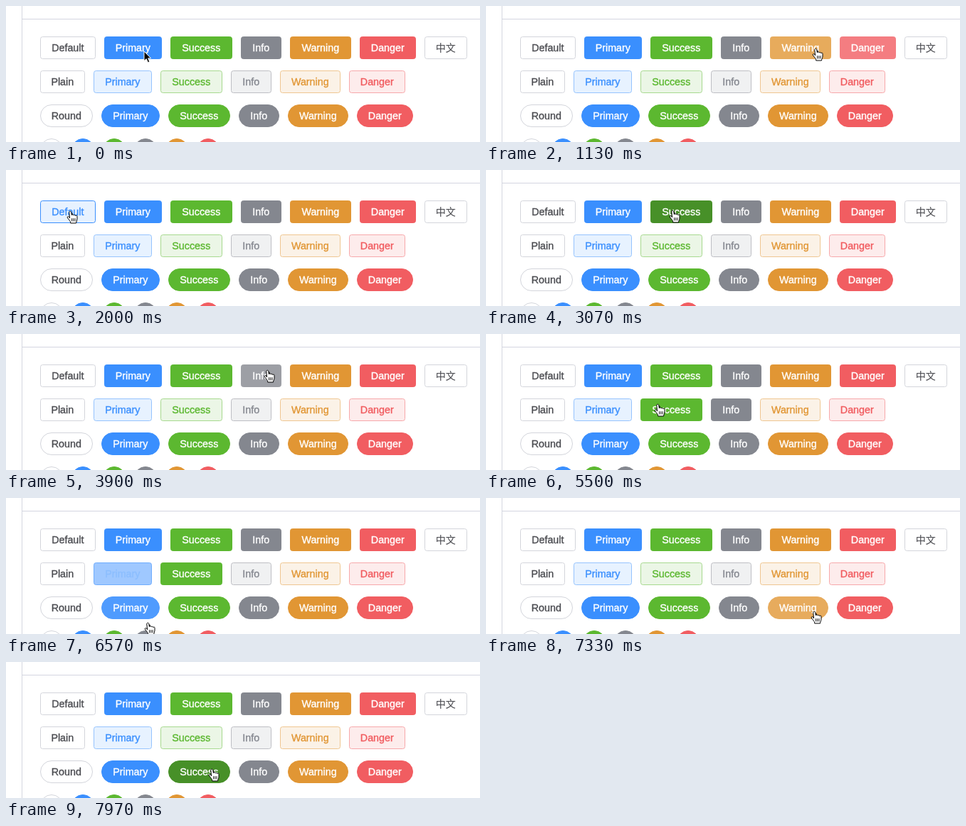
Animation, 666 px wide and 192 px high, one loop 8000 ms. Source, as an HTML page:

```html
<!DOCTYPE html>
<html lang="en">
<head>
<meta charset="utf-8">
<title>Buttons</title>
<style>
html, body { margin: 0; width: 100%; height: 100%; overflow: hidden; background: #fff; }
svg { display: block; width: 666px; height: 192px; }
text { font: 14.3px "Liberation Sans", Arial, sans-serif; text-anchor: middle; stroke-width: .35px; }
.cjk { font: 14px "Noto Sans CJK SC", "Noto Sans CJK", sans-serif; stroke-width: .1px; }
</style>
</head>
<body>
<svg viewBox="0 0 666 192">
  <path d="M22.5 0V192M22 18.5H666" stroke="#d4d6e0" fill="none"/>
  <g id="buttons"></g>
  <path id="arrow" d="M0 0V13.5L3.2 10.6 5.4 15.7 7.8 14.7 5.6 9.8H9.6Z" stroke="#fff"/>
  <g id="hand" stroke="#000" stroke-linejoin="round" stroke-linecap="round">
    <path d="M-1.5 9.5L-2.2 2C-2.3 0 .3-.4 .7 1.4L1.4 5.6C2-.1 2 4.6 2.2 5.2 2.8 4.6 4 4.8 4.4 6 4.9 5 6.5 5.2 6.8 6.7 7.3 5.6 9 5.8 9 7.4V11C9 13.3 7.6 14.6 7.5 17H-.3C-.3 15-.8 14.4-1.5 13.4-2.5 11.8-4.1 10.7-4.8 9.1-5.2 7.7-3.4 7.1-2.4 8.2Z" fill="#fff"/>
    <path d="M1.6 10.6V14M3.8 10.6V14M6 10.6V14" stroke-width=".9"/>
  </g>
</svg>
<script>
const NS = 'http://www.w3.org/2000/svg';
const LOOP = 8000, FRAMES = 240, STEP = LOOP / FRAMES, SUB = 16;
const FADE_IN = 40, HOLD = 80, FADE_OUT = 60;
const HEIGHT = 32, GAP = 12;
const $ = id => document.getElementById(id);

const rgb = hex => [1, 3, 5].map(i => parseInt(hex.slice(i, i + 2), 16));
const mix = (a, b, k) => a.map((v, i) => v + (b[i] - v) * k);
const css = c => `rgb(${c.map(Math.round)})`;

const WHITE = rgb('#ffffff'), BLUE = rgb('#3a8ffe');
const tint = (c, k) => mix(c, WHITE, k);

const tone = (label, width, hex, hover) => {
  const c = rgb(hex);
  return { label, width, c, hover: hover ? rgb(hover) : tint(c, .2) };
};
const tones = [
  tone('Primary', 81.4, '#3a8ffe'),
  tone('Success', 87, '#5cb830', '#479028'),
  tone('Info', 57, '#84878f'),
  tone('Warning', 85.6, '#e19634'),
  tone('Danger', 79, '#f15d61')
];

// A style gives [background, border, text] at rest and hovered
const neutral = [[WHITE, rgb('#d3d5db'), rgb('#4c4d52')], [tint(BLUE, .88), BLUE, BLUE]];
const solid = ({ c, hover }) => [[c, c, WHITE], [hover, hover, WHITE]];
const plain = ({ c }) => [[tint(c, .88), tint(c, .46), c], [c, c, WHITE]];

const buttons = [];

function make(tag, attrs) {
  const el = document.createElementNS(NS, tag);
  for (const k in attrs) el.setAttribute(k, attrs[k]);
  return $('buttons').appendChild(el);
}

function addButton(label, left, y, width, rx, looks) {
  const x = Math.round(left), w = Math.round(left + width) - x;
  const box = make('rect', { x: x + .5, y: y + .5, width: w - 1, height: HEIGHT - 1, rx });
  const text = make('text', { x: x + w / 2 - .2, y: y + 21, class: label === '中文' ? 'cjk' : '' });
  text.textContent = label;
  buttons.push({ x, y, w, looks, box, text, level: 0, hold: 0 });
  return left + width + GAP;
}

function addRow(first, width, y, rx, style) {
  let x = addButton(first, 48, y, width, rx, neutral);
  for (const t of tones) {
    x = addButton(first && t.label, x, y, first ? t.width : HEIGHT, rx, style(t));
  }
  return x;
}

const end = addRow('Default', 77.8, 43, 3, solid);
addButton('中文', end, 43, 60, 3, neutral);
addRow('Plain', 63.2, 91, 3, plain);
addRow('Round', 74.2, 139, 15.5, solid);
addRow('', HEIGHT, 187, 15.5, solid);

// Pointer stops: time, x, y
const path = [
  [0, 194, 64], [800, 533, 60], [1000, 533, 60], [1850, 91, 58], [2400, 91, 58],
  [3066, 263, 57], [3900, 368, 51], [4450, 530, 57], [4800, 525, 178],
  [5200, 518, 106], [5500, 242, 99], [6500, 220, 102], [6520, 198, 106], [6566, 200, 176],
  [6720, 185, 164], [7450, 515, 159], [7800, 318, 158], [LOOP, 284, 150]
];

function pointerAt(t) {
  const i = path.findIndex(p => p[0] > t);
  const [t0, ...from] = path[i - 1], [t1, ...to] = path[i];
  return mix(from, to, (t - t0) / (t1 - t0));
}

function advance(b, [px, py], dt) {
  const inside = px >= b.x && px < b.x + b.w && py >= b.y && py < b.y + HEIGHT;
  if (inside) {
    b.hold = HOLD;
    b.level = Math.min(1, b.level + dt / FADE_IN);
  } else if (b.hold > 0) {
    b.hold -= dt;
  } else {
    b.level = Math.max(0, b.level - dt / FADE_OUT);
  }
}

// Hover levels for the whole loop, worked out once
const states = [];
for (let f = 0; f < FRAMES; f++) {
  states.push({
    pos: pointerAt(f * STEP),
    levels: buttons.map(b => b.level),
    hand: buttons.some(b => b.hold > 0)
  });
  for (let s = 0; s < SUB; s++) {
    const pos = pointerAt((f + s / SUB) * STEP);
    buttons.forEach(b => advance(b, pos, STEP / SUB));
  }
}

function draw(t) {
  const { pos, levels, hand } = states[Math.floor(t / STEP + .1) % FRAMES];
  buttons.forEach(({ looks: [rest, over], box, text }, i) => {
    const [fill, line, ink] = rest.map((c, j) => css(mix(c, over[j], levels[i])));
    box.setAttribute('fill', fill);
    box.setAttribute('stroke', line);
    text.setAttribute('fill', ink);
    text.setAttribute('stroke', ink);
  });
  for (const id of ['arrow', 'hand']) {
    $(id).setAttribute('transform', `translate(${pos.map(Math.round)})`);
    $(id).setAttribute('visibility', (id === 'hand') === hand ? 'visible' : 'hidden');
  }
}

const start = performance.now();
function tick() {
  draw((performance.now() - start) % LOOP);
  requestAnimationFrame(tick);
}
tick();
</script>
</body>
</html>
```
